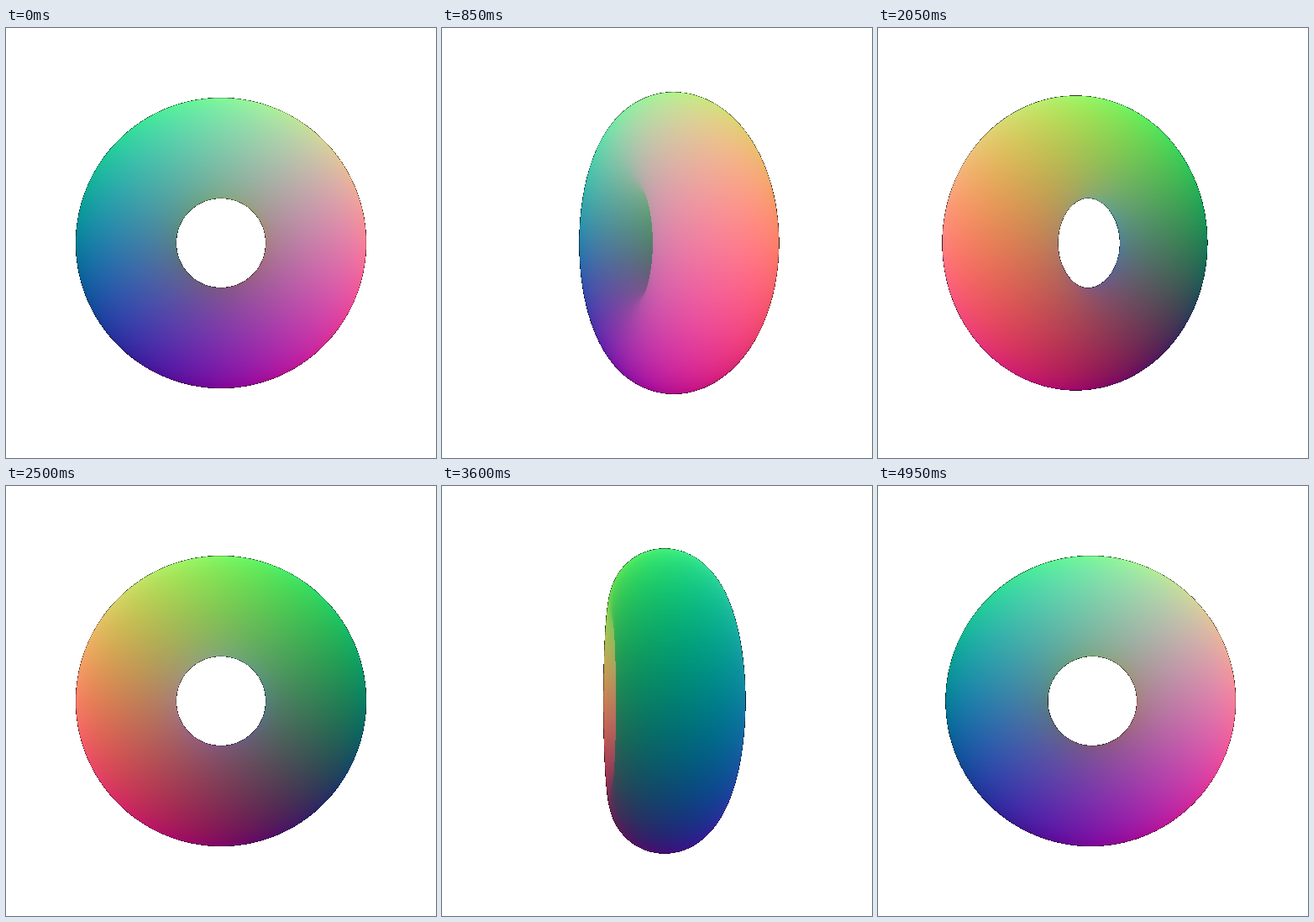
Animation, 512 px wide and 512 px high, one loop 5000 ms. Source, as an HTML page with a canvas:

```html
<!DOCTYPE html>
<html>
<head>
<meta charset="utf-8">
<style>
html, body { margin: 0; width: 100%; height: 100%; overflow: hidden; background: #fff; }
canvas { display: block; width: 512px; height: 512px; }
</style>
</head>
<body>
<canvas id="stage" width="512" height="512"></canvas>
<script>
const SIZE = 512, MID = SIZE / 2, LOOP = 5000, STEP = 50;
const TUBE = 0.341, RING = 1 - TUBE;          // outer radius is 1
const DIST = 2.69, FOCAL = 454;               // camera distance and focal length
const REACH = 184;                            // projected bounding circle
const SUBPIXELS = [[-0.125, -0.375], [0.375, -0.125], [-0.375, 0.125], [0.125, 0.375]];

const ctx = document.getElementById('stage').getContext('2d');
const image = ctx.createImageData(SIZE, SIZE);
const pixels = new Uint32Array(image.data.buffer);
const mask = new Uint8Array(SIZE * SIZE);
const hit = { x: 0, y: 0, z: 0 };
let cos = 1, sin = 0;

// Marches a ray through screen point (sx, sy); stores the hit in object space.
function trace(sx, sy) {
  const len = Math.hypot(sx, sy, FOCAL);
  const vx = sx / len, dy = -sy / len, vz = -FOCAL / len;
  const dx = vx * cos + vz * sin, dz = vz * cos - vx * sin;
  const ox = DIST * sin, oz = DIST * cos;
  let t = DIST - 1;
  for (let i = 0; i < 500 && t < DIST + 1; i++) {
    const x = ox + dx * t, y = dy * t, z = oz + dz * t;
    const q = Math.sqrt(x * x + y * y) - RING;
    const d = Math.sqrt(q * q + z * z) - TUBE;
    if (d < 0.0002) {
      hit.x = x; hit.y = y; hit.z = z;
      return true;
    }
    t += d;
  }
  return false;
}

const channel = (v, k) => Math.max(0, Math.min(255, (v * 0.5 + 0.5) * 255 * k)) | 0;
const shade = k => (255 << 24 | channel(hit.z, k) << 16 | channel(hit.y, k) << 8 | channel(hit.x, k)) >>> 0;

// Silhouette pixels blend towards black by their coverage.
function shadeEdge(sx, sy) {
  let count = 0;
  for (const [ax, ay] of SUBPIXELS) if (trace(sx + ax, sy + ay)) count++;
  return count ? shade(count / SUBPIXELS.length) : 0xffffffff;
}

function render(angle) {
  cos = Math.cos(angle);
  sin = Math.sin(angle);
  pixels.fill(0xffffffff);
  mask.fill(0);
  const lo = MID - REACH, hi = MID + REACH;
  for (let y = lo; y < hi; y++) {
    for (let x = lo; x < hi; x++) {
      const sx = x + 0.5 - MID, sy = y + 0.5 - MID, i = y * SIZE + x;
      if (sx * sx + sy * sy < REACH * REACH && trace(sx, sy)) {
        mask[i] = 1;
        pixels[i] = shade(1);
      }
    }
  }
  for (let y = lo; y < hi; y++) {
    for (let x = lo; x < hi; x++) {
      const i = y * SIZE + x;
      const near = mask[i - 1] + mask[i + 1] + mask[i - SIZE] + mask[i + SIZE];
      if (near !== mask[i] * 4) pixels[i] = shadeEdge(x + 0.5 - MID, y + 0.5 - MID);
    }
  }
  ctx.putImageData(image, 0, 0);
}

const start = performance.now();
let shown = -1;
function tick() {
  const step = Math.floor((performance.now() - start) % LOOP / STEP);
  if (step !== shown) {
    shown = step;
    render(step * STEP / LOOP * 2 * Math.PI);
  }
  requestAnimationFrame(tick);
}
tick();
</script>
</body>
</html>
```
